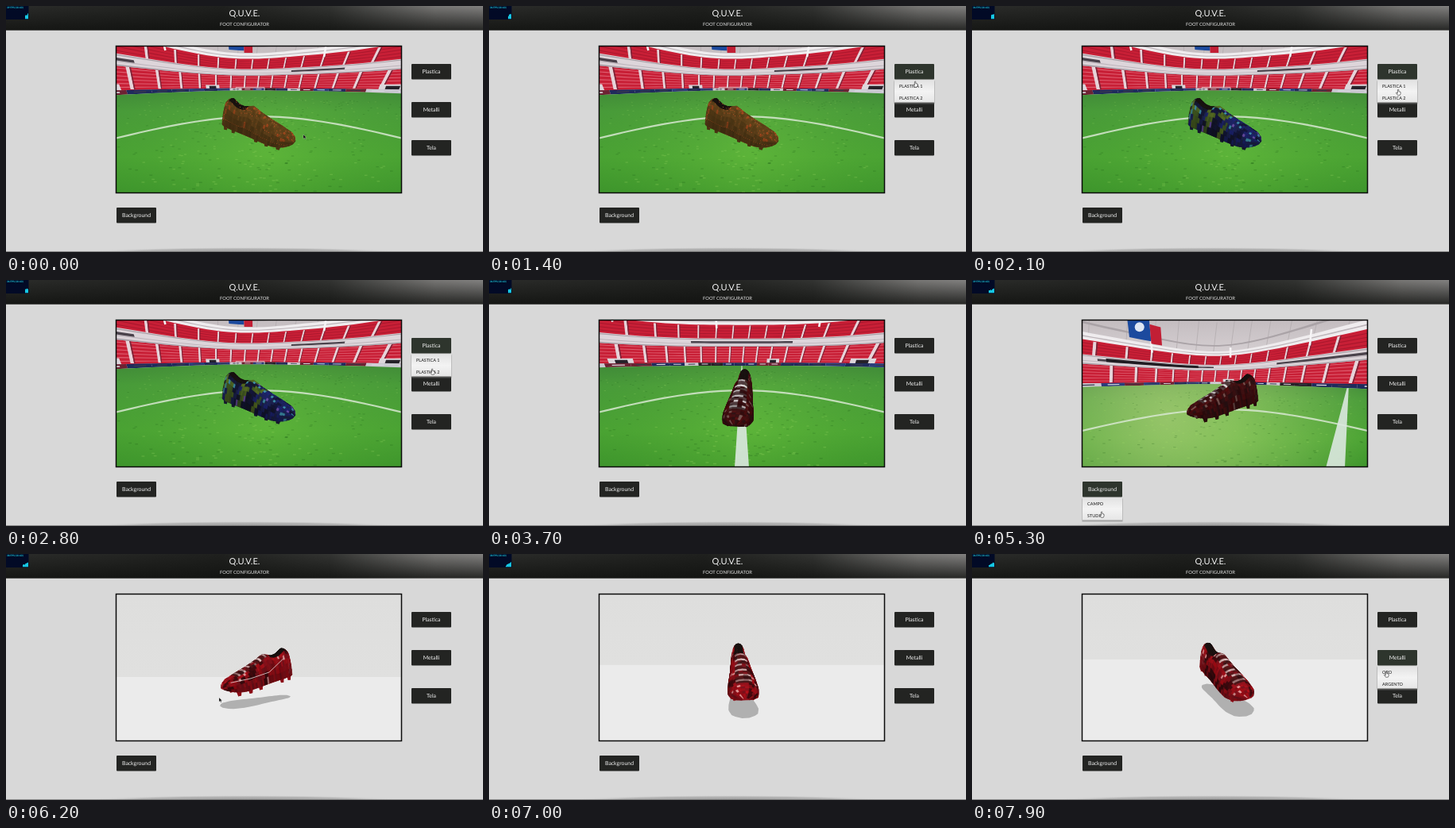
Write an HTML page with a canvas that moves like this. It is 600x310 px and loops after 8 s.

```html
<!DOCTYPE html>
<html lang="it">
<head>
<meta charset="utf-8">
<title>Foot configurator</title>
<style>
html, body { margin: 0; width: 100%; height: 100%; overflow: hidden; background: #d8d8d8; }
body { position: relative; }
canvas { position: absolute; left: 139px; top: 51px; width: 358px; height: 184px; }
svg { position: absolute; left: 0; top: 0; width: 600px; height: 310px; }
text { font-family: Lato, "Open Sans", sans-serif; text-rendering: geometricPrecision; }
</style>
</head>
<body>
<canvas id="view"></canvas>
<svg id="ui" viewBox="0 0 600 310">
  <defs>
    <linearGradient id="bar">
      <stop offset="0" stop-color="#2b2c2a"/><stop offset=".45" stop-color="#1f201e"/>
      <stop offset=".68" stop-color="#333432"/><stop offset=".9" stop-color="#787775"/>
      <stop offset="1" stop-color="#828180"/>
    </linearGradient>
    <linearGradient id="dusk" x2="0" y2="1">
      <stop offset="0" stop-color="#10110f" stop-opacity="0"/><stop offset="1" stop-color="#10110f" stop-opacity=".8"/>
    </linearGradient>
    <linearGradient id="menuFill" x2="0" y2="1">
      <stop offset="0" stop-color="#e2e2e2"/><stop offset=".5" stop-color="#f3f3f3"/><stop offset="1" stop-color="#e6e6e6"/>
    </linearGradient>
    <radialGradient id="dock">
      <stop offset="0" stop-color="#9a9a9a"/><stop offset=".7" stop-color="#acacac" stop-opacity=".8"/>
      <stop offset="1" stop-color="#d8d8d8" stop-opacity="0"/>
    </radialGradient>
  </defs>
  <rect width="600" height="30.5" fill="url(#bar)"/>
  <rect width="600" height="30.5" fill="url(#dusk)"/>
  <text x="300" y="13.2" font-size="11" fill="#f2f2f2" text-anchor="middle">Q.U.V.E.</text>
  <text x="300" y="25.4" font-size="5.8" fill="#e4e4e4" text-anchor="middle">FOOT CONFIGURATOR</text>
  <rect width="28.5" height="17" fill="#020a26"/>
  <text id="fps" x="1" y="3.4" font-size="3.1" font-weight="bold" fill="#1fd7e8"></text>
  <path id="graph" fill="#16c8e4"/>
  <rect x="138.5" y="50.5" width="359" height="185" fill="none" stroke="#0b0b0b" stroke-width="1.5"/>
  <ellipse cx="300" cy="310" rx="197" ry="6" fill="url(#dock)"/>
  <rect y="309.3" width="600" height=".7" fill="#666"/>
  <g id="controls"></g>
  <path id="arrow" d="M0 0V5.2L1.3 4.1L2.2 6L3.1 5.6L2.2 3.8H3.8Z" fill="#0c0c0c" stroke="#ddd" stroke-width=".3"/>
  <path id="hand" d="M-.6 3V-1.6Q.1 -2.6 .8 -1.6V.6L3 1.1Q3.5 3.7 2.3 5.2H-.6L-2.6 2.3Q-2 1.2 -.6 3Z" fill="#fff" stroke="#222" stroke-width=".6"/>
</svg>
<script>
const LOOP = 8000, W = 358, H = 184, RAD = Math.PI / 180;
const $ = id => document.getElementById(id);
const canvas = $('view'), g = canvas.getContext('2d');
const dpr = window.devicePixelRatio || 1;
canvas.width = W * dpr;
canvas.height = H * dpr;

const hash = (i, j = 0) => {
  const s = Math.sin(i * 12.9898 + j * 78.233) * 43758.5453;
  return s - Math.floor(s);
};
// value of one column of a key list at position t
function track(keys, t, col = 1) {
  if (t <= keys[0][0]) return keys[0][col];
  for (let i = 1; i < keys.length; i++) {
    const a = keys[i - 1], b = keys[i];
    if (t <= b[0]) return a[col] + (b[col] - a[col]) * (t - a[0]) / (b[0] - a[0]);
  }
  return keys[keys.length - 1][col];
}

const TURN = [[3100, 63], [3700, -8], [4250, -58], [6450, -58], [7250, 35]];
const PITCH = [[3700, 18], [4250, 7.5], [6450, 7.5], [7250, 22]];
const POINTER = [
  [300, 374, 162], [1000, 530, 84], [1400, 536, 97], [1700, 536, 98], [2400, 536, 114],
  [2900, 536, 114], [3300, 380, 150], [4350, 300, 160], [4800, 165, 262], [5200, 163, 294],
  [5500, 163, 294], [6000, 165, 264], [6200, 268, 181], [6500, 268, 181], [7200, 400, 160],
  [7450, 535, 130], [7900, 521, 150]
];

let yaw, pitch, cp, sp, cy, sy;
function setCamera(t) {
  yaw = track(TURN, t);
  pitch = track(PITCH, t);
  cp = Math.cos(pitch * RAD); sp = Math.sin(pitch * RAD);
  cy = Math.cos(yaw * RAD); sy = Math.sin(yaw * RAD);
}

function poly(pts, fill) {
  g.beginPath();
  pts.forEach(p => g.lineTo(p[0], p[1]));
  g.closePath();
  g.fillStyle = fill;
  g.fill();
}
function line(pts, color, width) {
  g.beginPath();
  pts.forEach(p => g.lineTo(p[0], p[1]));
  g.strokeStyle = color;
  g.lineWidth = width;
  g.stroke();
}

// ---- stadium: camera at the origin, one unit above the grass ----
const FOCAL = 130;
const heading = () => yaw + 8;
const seen = (b, margin = 58) => Math.abs(b - heading()) < margin;
const project = (x, y, z) => {
  const d = z * cp - y * sp;
  return [179 + FOCAL * x / d, 92 - FOCAL * (y * cp + z * sp) / d, d];
};
const polar = (b, r, h) => {
  const a = (b - heading()) * RAD;
  return project(r * Math.sin(a), h, r * Math.cos(a));
};
// rounded rectangle, longer towards the goals
const wallR = b => {
  const n = 3, c = Math.abs(Math.cos(b * RAD)) / 19.7, s = Math.abs(Math.sin(b * RAD)) / 24;
  return (c ** n + s ** n) ** (-1 / n);
};
const wall = (b, h) => polar(b, wallR(b), h);

function band(b0, b1, h0, h1, fill) {
  const from = Math.max(b0, heading() - 62), to = Math.min(b1, heading() + 62);
  if (from >= to) return;
  const n = Math.ceil((to - from) / 3), low = [], high = [];
  for (let i = 0; i <= n; i++) {
    const b = from + (to - from) * i / n;
    low.push(wall(b, h0));
    high.unshift(wall(b, h1));
  }
  poly(low.concat(high), fill);
}
const ring = (h0, h1, fill) => band(-180, 180, h0, h1, fill);

function aisles(h0, h1, step, shift, width) {
  for (let b = -112 + shift; b < 136; b += step) {
    if (!seen(b, 60)) continue;
    poly([wall(b, h0), wall(b + width, h0), wall(b + width + .7, h1), wall(b + .7, h1)], '#e6d3d9');
    poly([wall(b + width, h0), wall(b + width + .3, h0), wall(b + width + 1, h1), wall(b + width + .7, h1)], '#7c2438');
  }
}

function roof() {
  const sky = g.createLinearGradient(0, 0, 0, 60);
  sky.addColorStop(0, '#c4bdc0');
  sky.addColorStop(1, '#ddd7da');
  g.fillStyle = sky;
  g.fillRect(0, 0, W, H);
  for (let b = -110; b < 136; b += 9) {
    if (seen(b, 56)) line([wall(b, 6.4), polar(b + 2, wallR(b) * .55, 7)], '#b3acaf', .8);
  }
  ring(7.6, 7.9, '#aaa3a7');
  ring(5.4, 6.5, '#efecee');
  ring(5.9, 6.05, '#bdb5ba');
}

function billboard(b) {
  if (!seen(b)) return;
  band(b - 3, b + 4, 7, 10.6, '#1c4a9e');
  band(b + 4, b + 8, 6.6, 9.9, '#c21f35');
  const c = wall(b + .5, 9);
  g.beginPath();
  g.arc(c[0], c[1], 6, 0, 7);
  g.fillStyle = '#dfe7f4';
  g.fill();
}

function stands() {
  ring(3.4, 5.5, '#c81f36');
  ring(-.5, 2.3, '#c81f36');
  for (let h = 3.75; h < 5.4; h += .42) ring(h, h + .1, 'rgba(120,10,30,.4)');
  for (let h = -.2; h < 2.2; h += .42) ring(h, h + .1, 'rgba(255,190,200,.4)');
  aisles(3.5, 5.4, 8, 3, .7);
  aisles(-.4, 2.2, 7, 0, .8);
  ring(2.2, 3.5, '#ddd5da');
  ring(3.3, 3.42, '#a89fa6');
  ring(2.2, 2.34, '#a59ca4');
  ring(2.62, 2.72, '#bcb3ba');
  [[-100, -56], [-24, 24], [87, 108]].forEach(([a, b]) => band(a, b, 2.75, 3.05, '#4a424b'));
  band(-98, -64, 2.7, 3.2, '#201c22');
  [-48, 16, 48, 122].forEach(b => {
    band(b - 3, b + 3, -.5, .2, '#ddd6db');
    band(b - 1.5, b + 1.5, -.5, 0, '#26222a');
  });
  [-84, -47, -12, 33, 100].forEach(b => {
    if (seen(b)) line([wall(b, 5), wall(b, 7.2)], '#f6f4f6', 2.6);
  });
  billboard(-88);
  billboard(60);
  const ads = ['#1f2b5c', '#c9c7d0', '#252028', '#6d2233', '#2b3d7b'];
  for (let i = 0; i < 43; i++) {
    const b = -118 + i * 6;
    band(b, b + 6, -1, -.48, ads[Math.floor(hash(i, 3) * 5)]);
    band(b + 1.5, b + 4.5, -.8, -.66, hash(i) > .5 ? '#d9d9df' : '#3b3b4d');
  }
}

function glow(x, y, r, inner, outer) {
  const light = g.createRadialGradient(x, y, 5, x, y, r);
  light.addColorStop(0, inner);
  light.addColorStop(1, outer);
  return light;
}

function pitchField() {
  const edge = [];
  for (let a = -64; a <= 64; a += 4) edge.push(wall(heading() + a, -1));
  const field = [...edge, [W + 90, H + 9], [-90, H + 9]];
  const grass = g.createLinearGradient(0, edge[16][1], 0, H);
  grass.addColorStop(0, '#468f3c');
  grass.addColorStop(.2, '#4fa23d');
  grass.addColorStop(.65, '#51ab36');
  grass.addColorStop(1, '#439c2e');
  poly(field, grass);
  poly(field, glow(190, 130, 190, 'rgba(125,205,65,.25)', 'rgba(30,110,30,.14)'));
  // sunlit part of the field
  if (seen(-80, 70)) {
    const s = polar(-80, 3.2, -1);
    poly(field, glow(s[0], s[1], 260, 'rgba(185,212,130,.65)', 'rgba(185,212,130,0)'));
  }
  for (let i = 0; i < 1100; i++) {
    const b = -125 + hash(i, 1) * 260;
    if (!seen(b)) continue;
    const p = polar(b, .75 * 14 ** hash(i, 2), -1), s = 1 + 1.6 / p[2];
    g.fillStyle = hash(i, 4) > .5 ? 'rgba(175,225,110,.22)' : 'rgba(15,75,15,.2)';
    g.fillRect(p[0], p[1], s * 1.6, s * .6);
  }

  const arc = [];
  for (let a = -66; a <= 66; a += 3) arc.push(polar(heading() + a, 3.42, -1));
  line(arc, 'rgba(215,232,208,.85)', 2.2);

  // halfway line
  const left = [], right = [];
  for (let k = 0; k <= 12; k++) {
    const z = .45 * (19.7 / .45) ** (k / 12), h = heading() * RAD;
    const at = x => project(x * Math.cos(h) - z * Math.sin(h), -1, x * Math.sin(h) + z * Math.cos(h));
    const l = at(-.07), r = at(.07);
    if (l[2] > .25 && r[2] > .25) { left.push(l); right.unshift(r); }
  }
  if (left.length > 1) poly(left.concat(right), 'rgba(220,232,224,.9)');

  if (seen(66)) line([wall(59, -1), wall(59, -.35), wall(74, -.35), wall(74, -1)], '#e6e6e6', .8);
}

function studio() {
  const edge = 104 - (pitch - 7.5) * 1.52;
  const back = g.createLinearGradient(0, 0, 0, edge);
  back.addColorStop(0, '#dededd');
  back.addColorStop(1, '#e0e0df');
  g.fillStyle = back;
  g.fillRect(0, 0, W, H);
  g.fillStyle = '#ebebeb';
  g.fillRect(0, edge, W, H);
}

// ---- shoe: sections from heel (0) to toe (1) as [u, height, half width] ----
const BODY = [
  [0, 20, 4], [.03, 34, 7], [.1, 38, 10], [.2, 32, 11], [.28, 31, 12], [.4, 35, 13],
  [.5, 30, 14.5], [.65, 24, 17], [.8, 19, 18], [.92, 14, 15], [.98, 9, 9], [1, 5, 4]
];
const LENGTH = 101, TILT = 8.5 * RAD, NU = 38, NA = 14;
const toeSpring = u => 5 * Math.max(0, (u - .75) / .25) ** 2;

function place(x, y, z) {
  const zd = x * cy - z * sy, depth = zd * cp + y * sp, k = 290 / (290 - depth);
  return [178 + (x * sy + z * cy) * k, 95 - (y * cp - zd * sp) * k, depth];
}
function local(x, y, z) {
  return place(x * Math.cos(TILT) + y * Math.sin(TILT), y * Math.cos(TILT) - x * Math.sin(TILT), z);
}
function skin(u, a) {
  const c = Math.cos(a), w = track(BODY, u, 2), base = toeSpring(u);
  const y = base + (track(BODY, u) - base * .5) * Math.sin(a) ** .85 - 17;
  return local((u - .5) * LENGTH, y, w * Math.sign(c) * Math.abs(c) ** .8);
}

const laced = (u, k) => u > .36 && u < .82 && k > .33 && k < .67;
const MATERIALS = {
  wire(u, k, n) {
    return n > .94 ? [150, 70, 28] : [82 + n * 26, 58 + n * 14, 22 + n * 8];
  },
  plastic(u, k, n, m) {
    if (n > .9) return m > .5 ? [60, 140, 165] : [105, 75, 165];
    if (u < .6 && m > .6) return [58 + n * 36, 82 + n * 34, 34];
    return m > .4 ? [28, 34, 70 + n * 50] : [20, 22, 38 + n * 30];
  },
  dark(u, k, n, m) {
    if (laced(u, k) && n > .35) return Math.floor(u * 38) % 3 ? [40 + n * 50, 28 + n * 40, 30 + n * 40] : [110 + n * 110, 106 + n * 108, 108 + n * 108];
    return n > .95 ? [120, 84, 80] : [42 + n * 44, 10 + m * 10, 12 + m * 10];
  },
  red(u, k, n, m) {
    if (laced(u, k) && n > .2) return Math.floor(u * 38) % 3 ? [44 + n * 46, 22, 24] : [110 + n * 110, 70 + n * 120, 70 + n * 120];
    if (m < .3) return [50 + n * 20, 10, 14];
    return n > .96 ? [225, 150, 150] : [116 + n * 62, 8 + m * 12, 16 + m * 14];
  }
};
const css = (c, s = 1) => `rgb(${c.map(v => Math.round(Math.min(255, v * s))).join()})`;

function shadow() {
  const a = [], b = [];
  for (let i = 0; i <= 24; i++) {
    const u = i / 24, w = track(BODY, u, 2), x = (u - .5) * LENGTH;
    a.push(place(x, -40, w));
    b.unshift(place(x, -40, -w));
  }
  poly(a.concat(b), '#b0b0b0');
}

function shoe(kind) {
  const paint = MATERIALS[kind], wire = kind === 'wire';
  const sole = { wire: '#4a3212', plastic: '#15182c', dark: '#260a0c', red: '#8c0c16' }[kind];
  [.07, .2, .55, .7, .85].forEach(u => [-.65, .65].forEach(s => {
    const x = (u - .5) * LENGTH, y = toeSpring(u) - 17, z = s * track(BODY, u, 2);
    poly([local(x - 4, y + 2, z), local(x + 4, y + 2, z), local(x + 2, y - 6, z), local(x - 2, y - 6, z)], sole);
    line([local(x, y + 2, z), local(x, y - 6, z)], sole, 3.5);
  }));
  const faces = [];
  for (let i = 0; i < NU; i++) {
    const u0 = i / NU, u1 = (i + 1) / NU;
    for (let j = 0; j <= NA; j++) {
      const under = j === NA, a0 = Math.PI * j / NA, a1 = under ? 0 : Math.PI * (j + 1) / NA;
      const pts = [skin(u0, a0), skin(u1, a0), skin(u1, a1), skin(u0, a1)];
      const k = (j + .5) / NA, hole = u0 > .07 && u0 < .33 && k > .36 && k < .64;
      const n = hash(i + 1, j + 1), m = hash(Math.floor((i + j) / 2) + 9, Math.floor(j / 2) + 5);
      const fill = under ? sole : hole ? '#17100f' : css(paint(u0, k, n, m), .68 + .36 * Math.sin(k * Math.PI));
      faces.push({ pts, fill, n, rim: j < 1 || j === NA - 1, z: pts.reduce((s, p) => s + p[2], 0) });
    }
  }
  faces.sort((a, b) => a.z - b.z).forEach(f => {
    poly(f.pts, f.fill);
    g.strokeStyle = f.fill;
    g.lineWidth = .5;
    g.stroke();
    if (wire && (f.rim || f.n > .72)) {
      g.fillStyle = '#c9542a';
      g.fillRect(f.pts[0][0], f.pts[0][1], .9, .9);
    }
  });
  if (kind === 'red' && yaw < -20) {
    line([skin(.93, .95), skin(.7, .55), skin(.42, .35), skin(.14, .75)], '#ecdcdc', .8);
  }
}

function drawView(t) {
  g.setTransform(dpr, 0, 0, dpr, 0, 0);
  if (t < 5400) {
    roof();
    stands();
    pitchField();
    shoe(t < 1600 ? 'wire' : t < 2900 ? 'plastic' : 'dark');
  } else {
    studio();
    shadow();
    shoe('red');
  }
}

// ---- controls ----
const SVG = 'http://www.w3.org/2000/svg';
function add(parent, tag, attrs, label) {
  const el = document.createElementNS(SVG, tag);
  for (const k in attrs) el.setAttribute(k, attrs[k]);
  if (label) el.textContent = label;
  return parent.appendChild(el);
}
function control(x, y, label, items, from, to) {
  const root = $('controls');
  const face = add(root, 'rect', { x, y, width: 50, height: 19.5, rx: 1 });
  add(root, 'text', { x: x + 25, y: y + 12.4, 'font-size': 6.9, fill: '#f1f1f1', 'text-anchor': 'middle' }, label);
  const menu = add(root, 'g', {});
  add(menu, 'rect', { x: x - .5, y: y + 21.5, width: 51, height: 29, fill: '#777', opacity: .55 });
  add(menu, 'rect', { x, y: y + 20.5, width: 50, height: 28, fill: 'url(#menuFill)' });
  items.forEach((s, i) => add(menu, 'text', { x: x + 6, y: y + 29.5 + 15.7 * i, 'font-size': 5.5, fill: '#161616' }, s));
  return { face, menu, from, to };
}
// later menus must cover the buttons below them
const controls = [
  control(139, 254, 'Background', ['CAMPO', 'STUDIO'], 4750, 6000),
  control(510, 169, 'Tela', [], 0, 0),
  control(510, 121, 'Metalli', ['ORO', 'ARGENTO'], 7400, LOOP),
  control(510, 73, 'Plastica', ['PLASTICA 1', 'PLASTICA 2'], 1000, 3000)
];

function drawUi(t) {
  let over = false;
  controls.forEach(c => {
    const open = t >= c.from && t < c.to;
    over = over || open;
    c.menu.style.display = open ? '' : 'none';
    c.face.setAttribute('fill', open ? '#2e352d' : '#232422');
  });
  const drag = (t >= 3300 && t < 4400) || (t >= 6500 && t < 7200);
  const at = `translate(${track(POINTER, t)} ${track(POINTER, t, 2)})`;
  $('arrow').setAttribute('transform', at);
  $('hand').setAttribute('transform', at);
  $('arrow').style.display = drag || over ? 'none' : '';
  $('hand').style.display = !drag && over ? '' : 'none';

  const s = Math.floor(t / 700);
  $('fps').textContent = `${t < 700 ? 39 : 36 + Math.floor(hash(s, 8) * 4)} FPS (10-60)`;
  const bars = t < 4000 ? 4 : 7;
  let d = 'M28 16.3';
  for (let i = 0; i < bars; i++) d += `V${9.5 + hash(s - i, 2) * 2 + i * (t < 4000 ? .6 : .55)}H${27 - i}`;
  $('graph').setAttribute('d', d + 'V16.3Z');
}

function draw(now) {
  const t = Math.floor((now % LOOP) / 100) * 100;
  setCamera(t);
  drawView(t);
  drawUi(t);
}
const start = performance.now();
function tick() {
  draw(performance.now() - start);
  requestAnimationFrame(tick);
}
tick();
</script>
</body>
</html>
```
